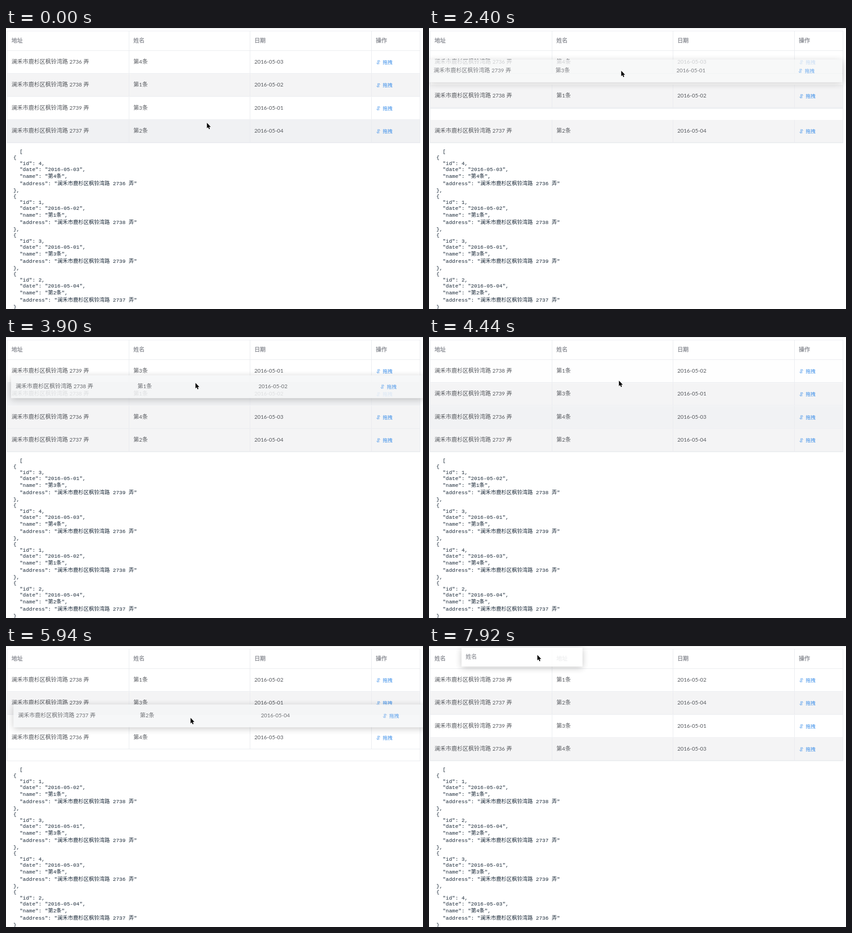
Write an HTML page that moves like this. It is 910 px wide and 615 px high and loops after 8 s.

```html
<!DOCTYPE html>
<html lang="zh">
<head>
<meta charset="utf-8">
<title>拖拽排序</title>
<style>
html, body { margin: 0; width: 100%; height: 100%; overflow: hidden; background: #fff; }
#stage {
  position: relative; width: 910px; height: 615px; overflow: hidden; background: #fff;
  font: 12.3px/16px "Liberation Sans", "Noto Sans CJK SC", "Noto Sans CJK JP", "Noto Sans CJK", sans-serif;
  color: #56595e;
}
#stage div { position: absolute; box-sizing: border-box; }
#stage svg { position: absolute; overflow: visible; }
i { font: 11.75px/16px Lato, "Liberation Sans", sans-serif; }
#top { left: 0; top: 1px; width: 910px; height: 1px; background: #e2e3e5; }
#table { left: 2px; top: 6px; width: 902px; height: 246px; border: 1px solid #e8eaee; }
#head { left: 0; top: 0; width: 910px; height: 50px; }
#head .label { top: 20px; }
#head .label, #headGhost { color: #85888f; -webkit-text-stroke: .3px; }
#head .line { top: 7px; width: 1px; height: 43px; background: #e8eaee; }
#head .base { left: 2px; top: 49px; width: 902px; height: 1px; background: #e8eaee; }
#rows { left: 0; top: 0; z-index: 0; }
.row { left: 2px; top: 0; width: 902px; height: 50.4px; border: solid #e8eaee; border-width: 0 1px 1px; }
.cell { top: 0; height: 100%; padding: 16px 0 0 9px; border-left: 1px solid #e8eaee; white-space: pre; }
.cell:first-child { border-color: transparent; }
.op { font-size: 10.7px; color: #348ae8; padding: 17px 0 0 24px; }
.op svg { left: 10px; top: 20px; }
.ghost { visibility: hidden; border-color: transparent; box-shadow: 0 3px 15px rgba(0,0,0,.26); background: #f5f6f7; }
.ghost .cell { border-color: transparent; }
#headGhost {
  left: 269px; top: 7px; width: 264px; height: 42px; padding: 13px 0 0 9px;
  background: #fff; opacity: .87;
}
.code {
  left: 16px; height: 14px; white-space: pre; color: #1b2a39;
  font: 11.44px/14px "Liberation Mono", "Noto Sans CJK SC", "Noto Sans CJK JP", "Noto Sans CJK", monospace;
}
#cursor { left: 0; top: 0; }
</style>
</head>
<body>
<div id="stage">
  <div id="top"></div>
  <div id="table"></div>
  <div id="head"><div class="base"></div></div>
  <div id="rows"></div>
  <div id="json"></div>
  <div id="rowGhost" class="row ghost"></div>
  <div id="headGhost" class="ghost">姓名</div>
  <svg id="cursor" width="12" height="18">
    <path d="M.5.5V12.6L3.2 10.1 5 14.5 7 13.6 5.2 9.4H8.9Z" fill="#000" stroke="#fff" paint-order="stroke"/>
  </svg>
</div>
<script>
const LOOP = 8000, STEP = 60, SLIDE = 120, FADE = 250;
const ROW_TOP = 50, ROW_H = 50.4;
const COLS = [2, 268, 532, 797, 904];
const $ = id => document.getElementById(id);

const records = {
  1: { date: '2016-05-02', no: 2738 },
  2: { date: '2016-05-04', no: 2737 },
  3: { date: '2016-05-01', no: 2739 },
  4: { date: '2016-05-03', no: 2736 }
};
const nameOf = id => `第${id}条`;
const addressOf = id => `澜禾市鹿杉区枫铃湾路 ${records[id].no} 弄`;

// pointer moves: start, end, destination x, y
const moves = [
  [240, 480, 420, 224], [600, 960, 427, 130], [1380, 1740, 421, 175],
  [1920, 2400, 419, 93], [2400, 2640, 418, 84], [2880, 3300, 404, 167],
  [3720, 3900, 413, 100], [3900, 4140, 414, 95], [4860, 5460, 388, 230],
  [5580, 6180, 410, 117], [6600, 6720, 448, 52], [6720, 7140, 434, 23],
  [7260, 7860, 236, 19]
];
// row order on screen, and the order stored in the data
const layouts = [
  [0, '4132'], [2342, '4312'], [2460, '3412'], [3760, '3142'],
  [3900, '1342'], [5880, '1324'], [6000, '1234']
];
const commits = [[0, '4132'], [2940, '3412'], [4380, '1342'], [6360, '1234']];
const hovers = [
  [-FADE, 3], [720, 2], [840, 1], [1560, 2], [2960, 0], [3060, 1], [3130, 2],
  [4420, 0], [5030, 1], [5150, 2], [5270, 3], [6650, 0], [6780, -1]
];
// row drags: start, drop, slot, opacity
const drags = [[1980, 2940, 2, .76], [3780, 4380, 2, .86], [5640, 6360, 3, .84]];
const HEAD_DRAG = 7320, HEAD_SWAP = 7690;

const clamp = v => Math.max(0, Math.min(1, v));
const smooth = v => (v = clamp(v), v * v * (3 - 2 * v));
const mix = (a, b, p) => a + (b - a) * p;
const current = (list, t) => list.filter(e => e[0] <= t).pop()[1];

function pointer(t) {
  let x = 438, y = 207;
  for (const [a, b, tx, ty] of moves) {
    const p = smooth((t - a) / (b - a));
    x = mix(x, tx, p);
    y = mix(y, ty, p);
  }
  return { x, y };
}

function rowTop(id, t) {
  let slot = layouts[0][1].indexOf(id);
  for (const [at, order] of layouts.slice(1))
    slot = mix(slot, order.indexOf(id), smooth((t - at) / SLIDE));
  return ROW_TOP + ROW_H * slot;
}

function hoverAmount(slot, t) {
  let v = 0;
  hovers.forEach(([at, s], i) => {
    const end = Math.min(t, i + 1 < hovers.length ? hovers[i + 1][0] : LOOP);
    v = mix(v, s === slot ? 1 : 0, clamp((end - at) / FADE));
  });
  return v;
}

function add(parent, cls, left, text = '') {
  const el = document.createElement('div');
  el.className = cls;
  el.style.left = left + 'px';
  el.textContent = text;
  return parent.appendChild(el);
}

const icon = '<svg width="9" height="10"><path d="M.5 6.3 3.3 9.3V.5M8.5 3.5 5.7.6V9.4" fill="none" stroke="#348ae8" stroke-width=".8"/></svg>';

function rowHtml(id) {
  return [addressOf(id), nameOf(id), records[id].date, icon + '拖拽'].map((s, i) => {
    const html = i < 3 ? s.replace(/[\d-]+/g, '<i>$&</i>') : s;
    const style = `left:${COLS[i] - 3}px;width:${COLS[i + 1] - COLS[i]}px`;
    return `<div class="cell${i === 3 ? ' op' : ''}" style="${style}">${html}</div>`;
  }).join('');
}

const labels = ['地址', '姓名', '日期', '操作'].map((s, i) => add($('head'), 'label', COLS[i] + 10, s));
COLS.forEach(x => add($('head'), 'line', Math.min(x, 903)));

const rows = {};
for (const id in records) {
  rows[id] = add($('rows'), 'row', 2);
  rows[id].innerHTML = rowHtml(id);
}

const lines = [];
function line(center) {
  const el = add($('json'), 'code', 16);
  el.style.top = center - 7 + 'px';
  lines.push(el);
}
line(271);
for (let i = 0; i < 4; i++) [0, 13, 26, 41, 57, 72].forEach(y => line(284 + 85 * i + y));

function jsonLines(order) {
  const out = ['  ['];
  [...order].forEach((id, i) => out.push(
    '{', `  "id": ${id},`, `  "date": "${records[id].date}",`, `  "name": "${nameOf(id)}",`,
    `  "address": "${addressOf(id)}"`, i < 3 ? '},' : '}'
  ));
  return out;
}

let shownJson, shownGhost;

function render(t) {
  const pos = pointer(t), stored = current(commits, t), order = current(layouts, t);
  $('cursor').style.transform = `translate(${pos.x}px,${pos.y}px)`;

  if (stored !== shownJson) {
    shownJson = stored;
    jsonLines(stored).forEach((s, i) => lines[i].textContent = s);
  }

  for (const id in rows) {
    const slot = stored.indexOf(id), st = rows[id].style;
    const tint = `rgba(240,241,243,${hoverAmount(slot, t)})`;
    st.transform = `translateY(${rowTop(id, t)}px)`;
    st.zIndex = order.indexOf(id);
    st.background = `linear-gradient(${tint},${tint}), ${slot % 2 ? '#f4f4f5' : '#fff'}`;
  }

  const drag = drags.find(([a, b]) => t >= a && t < b), ghost = $('rowGhost');
  ghost.style.visibility = drag ? 'visible' : 'hidden';
  if (drag) {
    const [start, , slot, opacity] = drag, from = pointer(start - STEP), id = stored[slot];
    if (id !== shownGhost) ghost.innerHTML = rowHtml(shownGhost = id);
    ghost.style.opacity = opacity;
    ghost.style.transform = `translate(${pos.x - from.x}px,${ROW_TOP + ROW_H * slot + pos.y - from.y}px)`;
  }

  const headGhost = $('headGhost').style, grab = pointer(HEAD_DRAG - STEP);
  headGhost.visibility = t >= HEAD_DRAG ? 'visible' : 'hidden';
  headGhost.transform = `translate(${pos.x - grab.x}px,${pos.y - grab.y}px)`;
  const swap = smooth((t - HEAD_SWAP) / SLIDE);
  labels[0].style.left = mix(12, 278, swap) + 'px';
  labels[1].style.left = mix(278, 12, swap) + 'px';
}

// the screen is refreshed in even steps
function tick() {
  render(Math.floor(performance.now() % LOOP / STEP) * STEP);
  requestAnimationFrame(tick);
}
tick();
</script>
</body>
</html>
```
